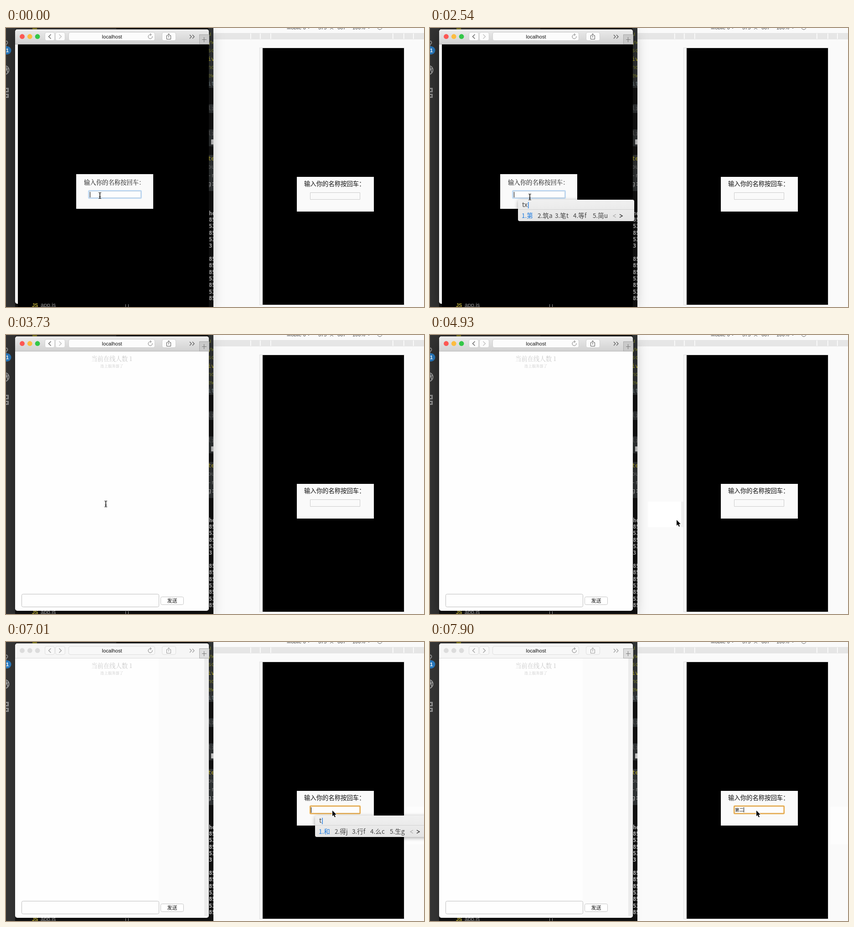
An HTML page with a canvas that plays this animation: 917x611 px, repeating every 8000 ms.

```html
<!DOCTYPE html>
<html lang="zh">
<head>
<meta charset="utf-8">
<style>
html, body { margin: 0; width: 100%; height: 100%; overflow: hidden; background: #000; }
canvas { display: block; }
</style>
</head>
<body>
<canvas id="stage" width="917" height="611"></canvas>
<script>
const ctx = document.getElementById('stage').getContext('2d');
const LOOP = 8000;
const SANS = '"Liberation Sans", Arial, sans-serif';
const HAN = '"Noto Sans CJK SC", "Noto Sans CJK JP", "Noto Sans CJK", sans-serif';
const SONG = '"Noto Serif CJK SC", ' + HAN;
const MONO = '"DejaVu Sans Mono", monospace';

// Each entry holds until the next: [time, x, y]
const POINTER = [
  [0, 206, 367], [150, 213, 369], [300, 219, 370],
  [4330, 245, 368], [4480, 310, 364], [4630, 395, 364], [4780, 480, 366],
  [4930, 541, 405], [5080, 640, 400], [5230, 748, 383],
  [5380, 736, 376], [5530, 724, 371], [5670, 721, 370], [5970, 716, 369]
];
const LEFT_CARET = [[0, 1], [300, 0], [750, 1], [1200, 0], [1650, 1], [3130, 0], [3280, 1]];
const RIGHT_CARET = [[0, 1], [6570, 0], [7010, 1]];
const LEFT_TEXT = [[0, ''], [2840, '第'], [3130, '第一']];
const RIGHT_TEXT = [[0, ''], [7300, '第'], [7900, '第二']];
const CANDIDATES = {
  t: ['和', '得j', '行f', '么c', '生g'],
  tx: ['第', '筑a', '笔t', '等f', '简u'],
  f: ['地', '二g', '城d', '霜s', '进j'],
  fg: ['二', '夫i', '无q', '增u', '干h']
};
const LEFT_IME = [[0, ''], [2390, 't'], [2540, 'tx'], [2840, '']];
const RIGHT_IME = [[0, ''], [7010, 't'], [7160, 'tx'], [7300, ''], [7450, 'f'], [7600, 'fg'], [7900, '']];

const held = (track, t) => track.filter(k => k[0] <= t).pop();
const value = (track, t) => held(track, t)[1];

function rect(x, y, w, h, color) {
  ctx.fillStyle = color;
  ctx.fillRect(x, y, w, h);
}
function round(x, y, w, h, r, fill, stroke) {
  ctx.beginPath();
  ctx.roundRect(x, y, w, h, r);
  if (fill) { ctx.fillStyle = fill; ctx.fill(); }
  if (stroke) { ctx.strokeStyle = stroke; ctx.lineWidth = 1; ctx.stroke(); }
}
function disc(x, y, r, fill) {
  ctx.beginPath();
  ctx.arc(x, y, r, 0, 7);
  ctx.fillStyle = fill;
  ctx.fill();
}
function line(points, color, width = 1) {
  ctx.beginPath();
  points.forEach(([x, y]) => ctx.lineTo(x, y));
  ctx.strokeStyle = color;
  ctx.lineWidth = width;
  ctx.stroke();
}
function label(s, x, y, size, color, family = SANS, weight = '') {
  ctx.font = `${weight} ${size}px ${family}`;
  ctx.fillStyle = color;
  ctx.fillText(s, x, y);
}
function vertical(y0, y1, a, b) {
  const g = ctx.createLinearGradient(0, y0, 0, y1);
  g.addColorStop(0, a);
  g.addColorStop(1, b);
  return g;
}

function drawEditor() {
  rect(0, 0, 917, 611, '#111');
  rect(0, 0, 20, 611, '#333');
  rect(20, 0, 222, 4, '#2b2b2b');
  rect(58, 0, 10, 3, '#77701f');
  ctx.strokeStyle = '#8b8b8b';
  ctx.lineWidth = 2;
  ctx.beginPath(); ctx.arc(0, 32, 3.5, 0, 7); ctx.stroke();
  line([[0, 36], [0, 44]], '#8b8b8b', 2);
  disc(2.5, 49, 9, '#2878bd');
  label('1', 0, 53, 11, '#fff', SANS, 'bold');
  ctx.strokeStyle = '#9a9a9a';
  ctx.beginPath(); ctx.arc(-3, 92, 9.5, 0, 7); ctx.stroke();
  line([[0, 85], [4, 98]], '#9a9a9a', 2);
  line([[0, 92], [6, 88]], '#9a9a9a', 2);
  rect(-3, 131, 9, 10, '#8c8c8c');
  rect(-3, 144, 9, 9, '#8c8c8c');
  rect(0, 134, 3, 4, '#333');
  rect(0, 147, 3, 3, '#333');

  [[0, 131], [167, 19], [222, 37], [278, 79]].forEach(([y, h]) => rect(444, y, 11, h, '#303334'));
  const code = ['u', 'yw', 'sc', 'iv', 'nd', 'ew', 'it'];
  code.forEach((s, i) => label(s, 443, 17 + i * 18.2, 12, i === 3 ? '#b8ae2a' : i === 6 ? '#75868b' : '#81842d', MONO));
  [['li', 180, '#666'], ['li', 235, '#666'], ['te', 290, '#c4b52d'], ['ou', 308, '#777'], ['-r', 327, '#888'], ['g:', 345, '#bbb']]
    .forEach(([s, y, c]) => label(s, 443, y, 12, c, MONO));
  rect(450, 244, 5, 11, '#c7c7c7');
  'ho 85 53 85 53 3 - 85 85 85 53 85 53 85'.split(' ').forEach((s, i) => {
    if (s !== '-') label(s, 445, 409.5 + i * 14.36, 12, '#bdbdbd', MONO, 'bold');
  });
}

function drawDevtools(t) {
  rect(455, 0, 462, 611, '#fafafa');
  const top = [['Mobile 6', 616], ['375', 685], ['667', 727], ['100%', 760]];
  top.forEach(([s, x]) => label(s, x, 3, 11, '#444'));
  [664, 796].forEach(x => line([[x - 3, -2], [x, 1], [x + 3, -2]], '#555'));
  line([[711, -3], [718, 3]], '#555');
  line([[718, -3], [711, 3]], '#555');
  ctx.strokeStyle = '#666';
  ctx.beginPath(); ctx.arc(820, -1.5, 5, 0, 7); ctx.stroke();
  rect(455, 11, 462, 14, '#e6e6e6');
  [536, 557, 580, 848, 872, 893].forEach(x => rect(x, 12, 1.5, 12, '#fff'));
  if (t >= 4930 && t < 6120) {
    rect(478, 365, 73, 56, '#fff');
    rect(551, 365, 5, 56, '#efefef');
  }
  if (t >= 7010) rect(878, 361, 39, 82, '#fdfdfd');
  ctx.strokeStyle = '#dedede';
  ctx.lineWidth = 1;
  ctx.strokeRect(556.5, 43.5, 317, 563);
  rect(563, 44, 310, 562, '#000');
}

function prompt(x, y, textX, textY, family) {
  rect(x, y, 169, 76, '#fafafa');
  label('输入你的名称按回车：', textX, textY, 13.36, '#111', family);
}

function entry(x, y, s, caret) {
  label(s, x, y + 9, 9.6, '#111', HAN);
  const w = s ? ctx.measureText(s).width : 0;
  if (caret) rect(Math.round(x + w), y, 1, s ? 11 : 12, '#000');
}

function drawRightPrompt(t) {
  prompt(638, 326, 654, 346, HAN);
  if (t < 5970) {
    round(667.5, 360.5, 109, 15, 0, '#fafafa', '#ccc');
    return;
  }
  round(665.5, 357.5, 113, 20, 3, '#f6d9a9');
  round(666.5, 358.5, 111, 18, 2, '#e0a03c');
  rect(668.5, 360.5, 107, 14, '#fdfdfd');
  entry(669, 362, value(RIGHT_TEXT, t), value(RIGHT_CARET, t));
}

function drawToolbar(active) {
  const ink = active ? '#555' : '#999';
  const button = active ? '#fcfcfc' : '#f8f8f8';
  const edge = active ? '#d0d0d0' : '#dedede';
  round(20, 3, 425, 33, [5, 5, 0, 0], active ? vertical(3, 36, '#ebebeb', '#d1d1d1') : '#f6f6f6');
  rect(20, 35, 425, 1, active ? '#b5b5b5' : '#dadada');
  ['#fc5753', '#fdbc40', '#33c748'].forEach((c, i) => disc(35.5 + i * 16.8, 18.7, 5.4, active ? c : '#dcdcdc'));
  [[85, 22], [108, 22], [137, 190], [342, 31]].forEach(([x, w]) => round(x + .5, 9.5, w - 1, 18, 3.5, button, edge));
  line([[98.5, 14], [93.5, 18.7], [98.5, 23.5]], ink, 1.2);
  line([[116.5, 14], [121.5, 18.7], [116.5, 23.5]], active ? '#bbb' : '#999', 1.2);
  ctx.textAlign = 'center';
  label('localhost', 232.5, 23, 11.2, '#111');
  ctx.textAlign = 'left';
  ctx.strokeStyle = '#777';
  ctx.lineWidth = 1;
  ctx.beginPath(); ctx.arc(316.5, 19, 4.5, -.2, 5); ctx.stroke();
  line([[316, 12], [319, 14.5], [316, 17]], '#777');
  line([[355, 16.5], [352.5, 16.5], [352.5, 24.5], [361.5, 24.5], [361.5, 16.5], [359, 16.5]], ink);
  line([[357, 21], [357, 12.5]], ink);
  line([[354.5, 15], [357, 12.5], [359.5, 15]], ink);
  [403, 409].forEach(x => line([[x, 15], [x + 4, 19], [x, 23]], ink, 1.2));
  rect(424, 14, 21, 21, active ? '#c9c9c9' : '#dedede');
  ctx.strokeStyle = '#aaa';
  ctx.lineWidth = 1;
  ctx.strokeRect(424.5, 14.5, 21, 21);
  line([[430, 25.5], [440, 25.5]], '#777');
  line([[434.5, 20], [434.5, 31]], '#777');
}

function drawLogin(t) {
  rect(26, 36, 419, 568, '#000');
  prompt(154, 320, 171, 343, SONG);
  if (t >= 2840) rect(184, 359, 139, 37, '#fefefe');
  round(180, 355, 118, 19, 3, '#bfd9f3');
  rect(182.5, 357.5, 113, 14, '#c4cbd2');
  rect(183, 358, 112, 13, '#fdfdfd');
  entry(184, 359, value(LEFT_TEXT, t), value(LEFT_CARET, t));
}

function drawChat(t) {
  if (t >= 6120) {
    rect(335, 36, 110, 564, '#fbfbfb');
    rect(435, 36, 10, 564, '#ececec');
  } else {
    rect(441, 36, 4, 564, '#f7f7f7');
  }
  label('当前在线人数 1', 187, 57, 13.36, '#c8c8c8', SONG);
  label('连上服务器了', 207, 71, 8.36, '#c8c8c8', SONG);
  round(34.5, 567.5, 301, 28, 3, '#fefefe', '#bdbdbd');
  round(339.5, 573.5, 50, 17, 3, '#fff', '#c4c4c4');
  label('发送', 353.5, 586, 11, '#111', HAN);
}

function drawBrowser(t) {
  const active = t < 5530;
  ctx.save();
  ctx.shadowColor = active ? 'rgba(0,0,0,.42)' : 'rgba(0,0,0,.16)';
  ctx.shadowBlur = active ? 30 : 16;
  ctx.shadowOffsetY = active ? 10 : 5;
  round(20, 3, 425, 601, 5, '#fefefe');
  ctx.restore();
  if (t < 3730) {
    drawLogin(t);
    rect(26, 604, 419, 7, '#000');
  } else {
    drawChat(t);
  }
  drawToolbar(active);
  ctx.save();
  ctx.beginPath();
  ctx.rect(20, t < 3730 ? 601 : 604, 425, 10);
  ctx.clip();
  label('JS', 57, 611, 11, '#b9a936', SANS, 'bold');
  label('app.js', 76, 611, 12.5, '#989898');
  rect(262, 605, 1, 6, '#999');
  rect(268, 605, 1, 6, '#999');
  ctx.restore();
}

function drawIme(x, y, keys) {
  if (!keys) return;
  ctx.save();
  ctx.shadowColor = 'rgba(0,0,0,.35)';
  ctx.shadowBlur = 8;
  ctx.shadowOffsetY = 2;
  round(x, y, 255, 47, 4, vertical(y, y + 47, '#f0f0f0', '#e4e4e4'));
  ctx.restore();
  rect(x, y + 21, 255, 1, '#d2d2d2');
  label(keys, x + 9, y + 16, 14, '#444', HAN);
  rect(x + 10 + ctx.measureText(keys).width, y + 5, 1.5, 14, '#2b80e0');
  const columns = [8, 43, 81, 121, 164];
  CANDIDATES[keys].forEach((s, i) => label(`${i + 1}.${s}`, x + columns[i], y + 40, 13.6, i ? '#444' : '#1d7be0', HAN));
  line([[x + 215, y + 32], [x + 209, y + 35.5], [x + 215, y + 39]], '#aaa', 1.2);
  line([[x + 223, y + 32], [x + 229, y + 35.5], [x + 223, y + 39]], '#222', 1.4);
}

function drawPointer(t) {
  const [, x, y] = held(POINTER, t);
  if (t < 4330) {
    const beam = [[x - 3, y - 6.5], [x - 1, y - 6.5], [x, y - 5.5], [x, y + 5.5], [x - 1, y + 6.5], [x - 3, y + 6.5]];
    const mirror = beam.map(([px, py]) => [2 * x - px, py]);
    [beam, mirror].forEach(p => line(p, '#222', 1.2));
    line([[x - 2, y + 2.5], [x + 2, y + 2.5]], '#222');
    return;
  }
  ctx.beginPath();
  [[0, 0], [0, 12.5], [2.8, 10], [5, 14.8], [7, 13.9], [4.9, 9.2], [8.8, 9]].forEach(([dx, dy]) => ctx.lineTo(x + dx, y + dy));
  ctx.closePath();
  ctx.strokeStyle = '#fff';
  ctx.lineWidth = 2;
  ctx.stroke();
  ctx.fillStyle = '#000';
  ctx.fill();
}

function draw(t) {
  drawEditor();
  drawDevtools(t);
  drawRightPrompt(t);
  drawBrowser(t);
  drawIme(193, 376, value(LEFT_IME, t));
  drawIme(t < 7300 ? 678 : 688, 380, value(RIGHT_IME, t));
  drawPointer(t);
}

const start = performance.now();
function tick() {
  draw((performance.now() - start) % LOOP);
  requestAnimationFrame(tick);
}
tick();
</script>
</body>
</html>
```
